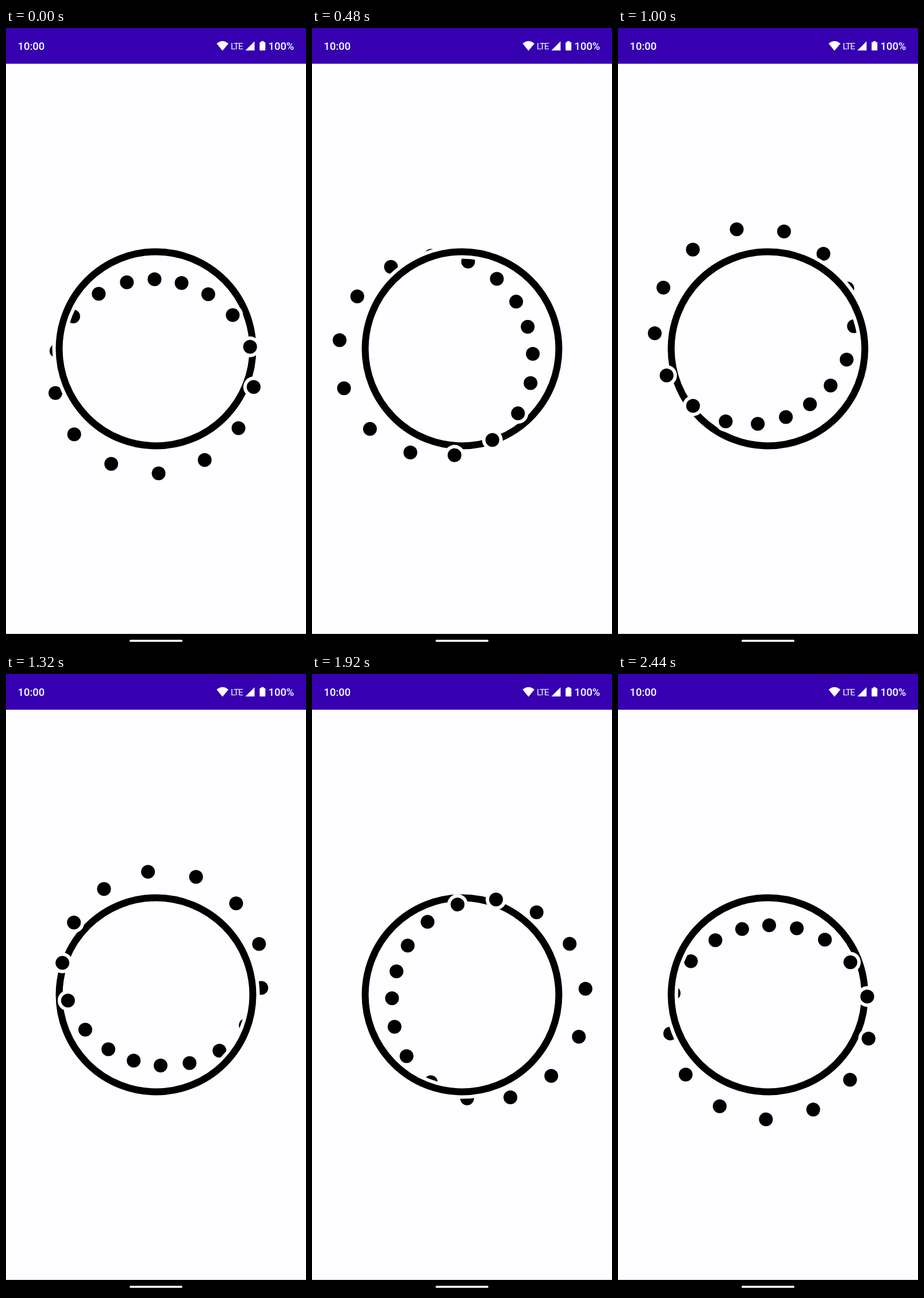
Write an HTML page that moves like this. It is 522x1073 px and loops after 2480 ms.

```html
<!DOCTYPE html>
<html lang="en">
<head>
<meta charset="utf-8">
<title>Dots weaving through a ring</title>
<style>
  html, body { margin: 0; width: 100%; height: 100%; overflow: hidden; background: #fefdff; }
  svg { display: block; width: 522px; height: 1073px; }
  text { font-family: Roboto, "Open Sans", sans-serif; fill: #fff; }
  .label { font-size: 18.4px; font-weight: 500; }
  .network { font-size: 15.5px; letter-spacing: -1.3px; }
  .gap { fill: #fefdff; }
  .ring, .ring-gap { fill: none; stroke: #000; stroke-width: 12; }
  .ring-gap { stroke: #fefdff; stroke-width: 24; }
</style>
</head>
<body>
<svg viewBox="0 0 522 1073">
  <rect width="522" height="1073" fill="#fefdff"/>

  <g transform="translate(261 557)">
    <g id="back"></g>
    <circle class="ring-gap" r="168.5"/>
    <circle class="ring" r="168.5"/>
    <g id="front"></g>
  </g>

  <rect width="522" height="62" fill="#3600b1"/>
  <text class="label" x="20.5" y="38">10:00</text>
  <text class="network" x="391" y="37">LTE</text>
  <text class="label" x="456.5" y="38">100%</text>
  <g fill="#fff">
    <path d="M366.5 27Q376.7 18.5 387 27L376.7 39.5Z"/>
    <path d="M416.5 39H432.5V23Z"/>
    <path d="M444 22.7H448.5V24.5H450.3Q451.3 24.5 451.3 25.5V38Q451.3 39 450.3 39H442.3Q441.3 39 441.3 38V25.5Q441.3 24.5 442.3 24.5H444Z"/>
  </g>

  <rect y="1052" width="522" height="21"/>
  <rect x="215" y="1062.3" width="92" height="3.4" rx="1.7" fill="#fff"/>
</svg>
<script>
  const LOOP = 2480, STEP = 40;
  const COUNT = 16, RADIUS = 168.5, SWING = 48;
  const DOT = 12, GAP = 18;
  const RAD = Math.PI / 180;
  const back = document.getElementById("back");
  const front = document.getElementById("front");

  function addCircle(parent, r, className) {
    const circle = document.createElementNS("http://www.w3.org/2000/svg", "circle");
    circle.setAttribute("r", r);
    if (className) circle.setAttribute("class", className);
    parent.append(circle);
    return circle;
  }

  function makeDots() {
    const halos = [], fronts = [], backs = [];
    for (let i = 0; i < COUNT; i++) {
      backs.push(addCircle(back, DOT));
      halos.push(addCircle(front, GAP, "gap"));
    }
    for (let i = 0; i < COUNT; i++) fronts.push(addCircle(front, DOT));
    return backs.map((dot, i) => ({ back: dot, halo: halos[i], front: fronts[i] }));
  }

  const dots = makeDots();

  function place(circle, x, y, visible) {
    circle.setAttribute("cx", x.toFixed(2));
    circle.setAttribute("cy", y.toFixed(2));
    circle.setAttribute("visibility", visible ? "visible" : "hidden");
  }

  // The dots turn one way while the tilt of their orbit turns the other.
  function draw(time) {
    const turn = -1.2 - 0.036 * time;
    const tilt = 94.5 + 0.144 * time;
    dots.forEach((dot, i) => {
      const angle = (turn + i * 360 / COUNT) * RAD;
      const phase = angle - tilt * RAD;
      const r = RADIUS + SWING * Math.cos(phase);
      const x = r * Math.cos(angle), y = r * Math.sin(angle);
      const isFront = Math.sin(phase) < 0;
      place(dot.back, x, y, !isFront);
      place(dot.halo, x, y, isFront);
      place(dot.front, x, y, isFront);
    });
  }

  const start = performance.now();
  function tick() {
    const time = (performance.now() - start) % LOOP;
    draw(Math.floor(time / STEP) * STEP);
    requestAnimationFrame(tick);
  }
  tick();
</script>
</body>
</html>
```
